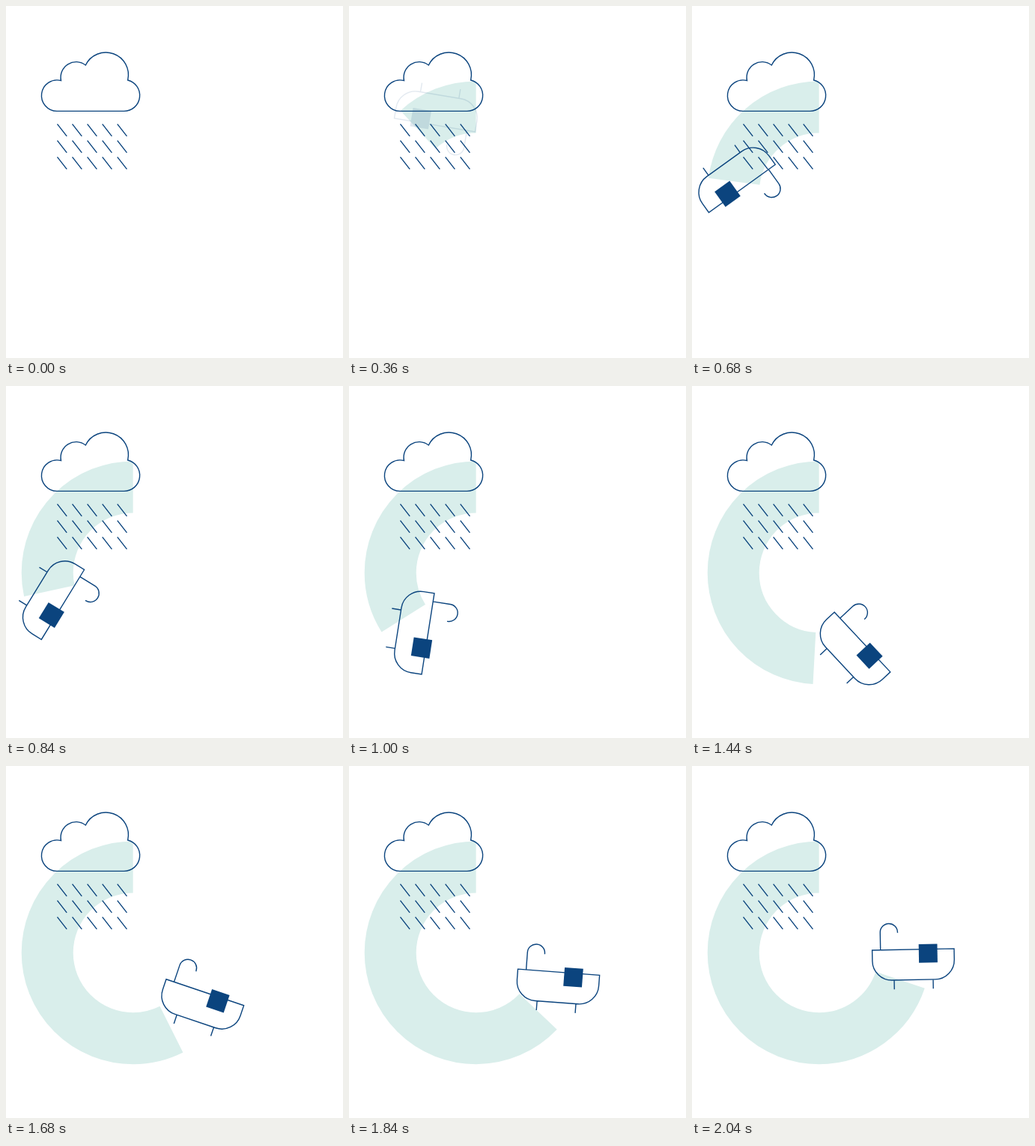
Write an HTML page that moves like this. It is 450x470 px and loops after 5000 ms.

```html
<!DOCTYPE html>
<html lang="en">
<head>
<meta charset="utf-8">
<title>Rain to bath</title>
<style>
  html, body { margin: 0; width: 100%; height: 100%; overflow: hidden; background: #fff; }
  svg { display: block; width: 100%; height: 100%; }
  .line { fill: none; stroke: #0b447e; stroke-width: 1.4; }
  .towel { fill: #0b447e; }
  .ring { fill: none; stroke: #d9eeeb; stroke-width: 69; }
</style>
</head>
<body>
<svg viewBox="0 0 450 470">
  <path id="ring" class="ring" pathLength="360" visibility="hidden"
        d="M169.6 134.9a114.4 114.4 0 0 0 0 228.8a114.4 114.4 0 0 0 0 -228.8"/>
  <path class="line" d="M68 140.4A20.75 20.75 0 1 1 73.5 99.6A20.6 20.6 0 0 1 106.3 79A30.05 30.05 0 0 1 162.6 99A21 21 0 0 1 157.6 140.4Z"/>
  <path id="rain" class="line"/>
  <g id="tub" opacity="0">
    <path class="line" d="M-54.7 -20H54.7V-5.5a26 26 0 0 1 -26 26H-28.7a26 26 0 0 1 -26 -26Z
      M-26 20.5v12.3M26 20.5v12.3M-43.6 -20V-43.4a11.6 11.6 0 0 1 23.2 0v.8"/>
    <rect class="towel" x="7.5" y="-26.9" width="24.8" height="24.8"/>
  </g>
</svg>
<script>
  const LOOP = 5000, STEP = 40, LAST = 51;
  const ring = document.getElementById('ring');
  const tub = document.getElementById('tub');

  let rain = '';
  for (let row = 0; row < 3; row++)
    for (let col = 0; col < 5; col++)
      rain += `M${68.5 + 20.05 * col} ${157.6 + 22 * row}l12.7 16.3`;
  document.getElementById('rain').setAttribute('d', rain);

  // The tub rolls leftwards around the ring, slowing down and drifting outwards at the end
  function tubPose(n) {
    const past = step => Math.max(0, n - step);
    const before = step => Math.max(0, step - n);
    const orbit = 25.1 + 6.75 * (n - 9) - 0.09 * past(28.5) ** 2;
    const reach = 114.6 + 0.028 * before(25) ** 2 + 0.104 * past(40) ** 2;
    const tilt = 98.9 - 5.66 * (n - 25) + 0.94 * past(25) + 0.281 * past(42) ** 2;
    return `translate(169.4 249.5) rotate(${-orbit}) translate(0 ${-reach}) rotate(${orbit + tilt})`;
  }

  function draw(time) {
    const n = Math.min(LAST, Math.floor((time % LOOP) / STEP));
    ring.setAttribute('visibility', n ? 'visible' : 'hidden');
    ring.setAttribute('stroke-dasharray', `${Math.max(0, 4.97 * n - 2.1)} 400`);
    tub.setAttribute('opacity', Math.min(1, Math.max(0, (n - 8.3) / 6)));
    tub.setAttribute('transform', tubPose(n));
  }

  const start = performance.now();
  function tick() {
    draw(performance.now() - start);
    requestAnimationFrame(tick);
  }
  tick();
</script>
</body>
</html>
```
